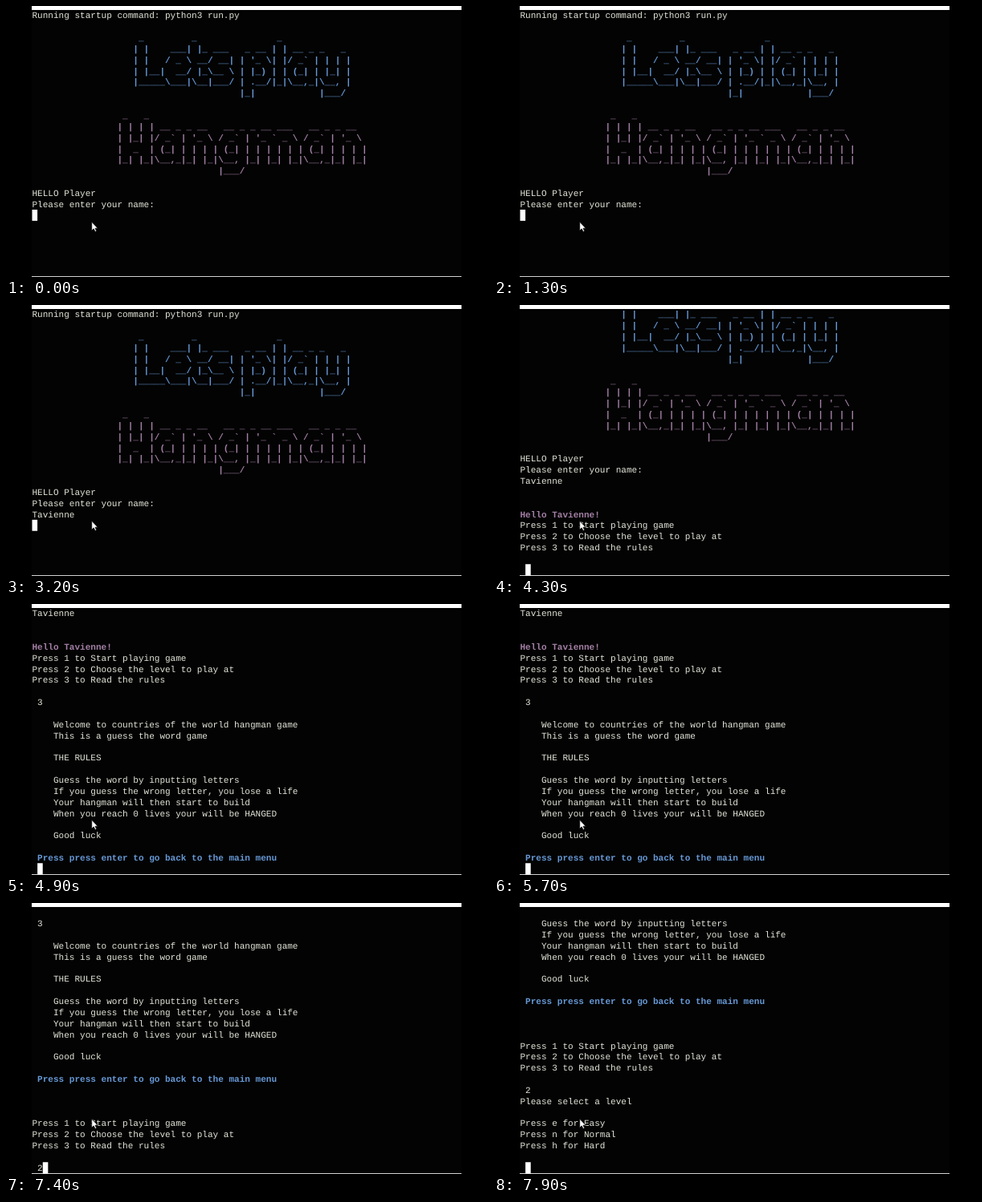
Animation of 600x338 px, one loop 8 s. Source, as an HTML page:

```html
<!DOCTYPE html>
<html lang="en">
<head>
<meta charset="utf-8">
<title>Hangman terminal</title>
<style>
  html, body { margin: 0; width: 100%; height: 100%; overflow: hidden; background: #000; }
  svg { display: block; width: 100vw; height: 100vh; }
  text {
    font: 11.04px "Liberation Mono", "Courier New", monospace;
    white-space: pre;
    text-rendering: geometricPrecision;
    fill: #e4e4da;
  }
  .blue { fill: #6799d6; font-weight: bold; }
  .plum { fill: #a480a6; font-weight: bold; }
</style>
</head>
<body>
<svg viewBox="0 0 600 338">
  <defs><clipPath id="view"><rect x="32" y="4.5" width="535" height="333.5"/></clipPath></defs>
  <rect width="600" height="338" fill="#000"/>
  <rect x="32" width="535" height="338" fill="#030303"/>
  <rect x="32" width="535" height="5" fill="#fff"/>
  <rect x="32" y="337" width="535" height="1" fill="#d0d0d0"/>
  <g clip-path="url(#view)">
    <g id="lines"></g>
    <rect id="caret" width="6.6" height="13.9" fill="#fff"/>
  </g>
  <path d="M106.7 269.2V280.2L109.2 277.9L110.9 281.6L112.7 280.8L111.1 277.2H114.3Z"
        fill="#fff" stroke="#111" stroke-width=".9"/>
</svg>
<script>
const LOOP = 8000, ROWS = 24;
const LEFT = 32.5, TOP = 4.7, CELL = 6.624, LINE = 13.85, BASE = 10.6;
const NAME = "Tavienne";

const letsPlay = String.raw`
 _         _               _
| |    ___| |_ ___   _ __ | | __ _ _   _
| |   / _ \ __/ __| | '_ \| |/ _~ | | | |
| |__|  __/ |_\__ \ | |_) | | (_| | |_| |
|_____\___|\__|___/ | .__/|_|\__,_|\__, |
                    |_|            |___/`;
const hangman = String.raw`
 _   _
| | | | __ _ _ __   __ _ _ __ ___   __ _ _ __
| |_| |/ _~ | '_ \ / _~ | '_ ~ _ \ / _~ | '_ \
|  _  | (_| | | | | (_| | | | | | | (_| | | | |
|_| |_|\__,_|_| |_|\__, |_| |_| |_|\__,_|_| |_|
                   |___/`;

// "~" stands for a backtick inside the banners
const banner = (art, indent, cls) => art.slice(1).split("\n")
  .map(s => [" ".repeat(indent) + s.replaceAll("~", "`"), cls]);

const menu = [
  "Press 1 to Start playing game",
  "Press 2 to Choose the level to play at",
  "Press 3 to Read the rules",
  ""
];

const log = [
  "Running startup command: python3 run.py",
  "",
  ...banner(letsPlay, 19, "blue"),
  "",
  ...banner(hangman, 16, "plum"),
  "",
  "HELLO Player",
  "Please enter your name:",
  NAME,
  "", "",
  [`Hello ${NAME}!`, "plum"],
  ...menu,
  " 3",
  "",
  "    Welcome to countries of the world hangman game",
  "    This is a guess the word game",
  "",
  "    THE RULES",
  "",
  "    Guess the word by inputting letters",
  "    If you guess the wrong letter, you lose a life",
  "    Your hangman will then start to build",
  "    When you reach 0 lives your will be HANGED",
  "",
  "    Good luck",
  "",
  [" Press press enter to go back to the main menu", "blue"],
  "", "", "",
  ...menu,
  " 2",
  "Please select a level",
  "",
  "Press e for Easy",
  "Press n for Normal",
  "Press h for Hard",
  "",
  " "
].map(entry => [].concat(entry));

// Caret moves: [time, row in log, column]
const moves = [
  [0, 18, 0],
  ...[...NAME].map((_, i) => [2100 + i * 110, 18, i + 1]),
  [3050, 19, 0],
  [3600, 26, 1],
  [4600, 26, 2],
  [4900, 41, 1],
  [5900, 48, 1],
  [7200, 48, 2],
  [7500, 55, 1]
];

const group = document.getElementById("lines");
const caret = document.getElementById("caret");
const rows = Array.from({ length: ROWS }, (_, i) => {
  const row = document.createElementNS("http://www.w3.org/2000/svg", "text");
  row.setAttribute("x", LEFT);
  row.setAttribute("y", TOP + i * LINE + BASE);
  return group.appendChild(row);
});

let shown;

function draw(time) {
  const move = moves.findLast(m => m[0] <= time);
  if (move === shown) return;
  shown = move;
  const [, at, col] = move;
  const top = Math.max(0, at - ROWS + 1);
  rows.forEach((row, i) => {
    const n = top + i;
    const [text, cls = ""] = n <= at ? log[n] : [""];
    row.textContent = n === at ? text.slice(0, col) : text;
    row.setAttribute("class", cls);
  });
  caret.setAttribute("x", LEFT + col * CELL);
  caret.setAttribute("y", TOP + (at - top) * LINE);
}

const start = performance.now();
function tick() {
  draw((performance.now() - start) % LOOP);
  requestAnimationFrame(tick);
}
tick();
</script>
</body>
</html>
```
